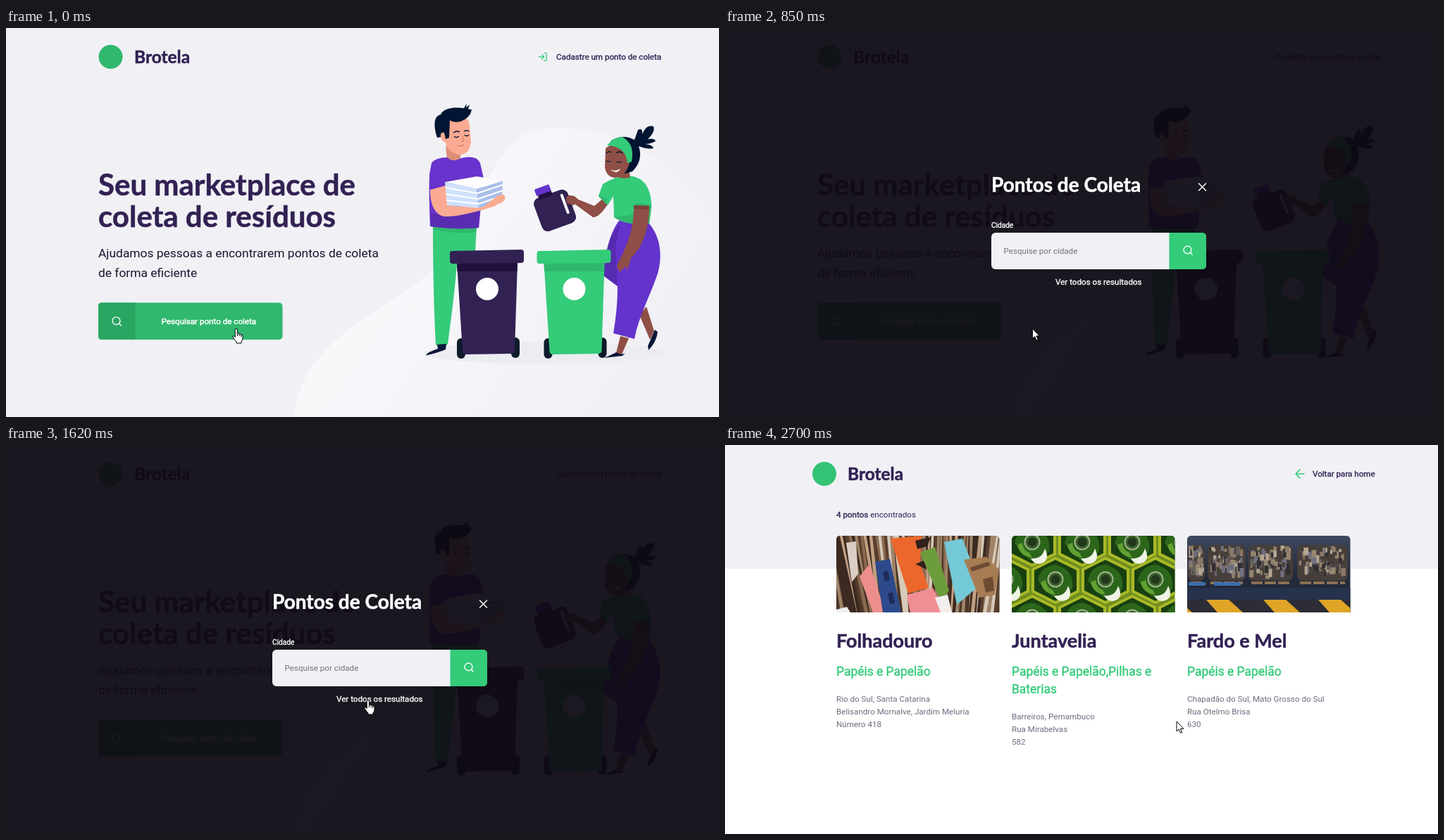
Write an HTML page that moves like this. It is 1012 px wide and 553 px high and loops after 3.48 s.

```html
<!DOCTYPE html>
<html lang="pt-BR">
<head>
<meta charset="utf-8">
<title>Pontos de coleta</title>
<style>
  html, body { margin: 0; width: 100%; height: 100%; overflow: hidden; background: #f0f0f5; }
  svg { display: block; width: 100%; height: 100%; }
  text { font: 11.63px Roboto, sans-serif; fill: #322153; white-space: pre; }
  .title { font: 700 27px Lato, sans-serif; stroke: #322153; stroke-width: .5px; }
  .brand { font-size: 24.5px; }
  .hero { font-size: 42px; }
  .lead { font-size: 17.4px; fill: #1e1430; }
  .semi { stroke: #322153; stroke-width: .35px; }
  .white { fill: #fff; stroke: #fff; }
  .items text { font-size: 17.45px; fill: #34cb79; stroke: #34cb79; stroke-width: .4px; }
  .address text { fill: #6c6c80; }
  .icon { fill: none; stroke-width: 2; stroke-linecap: round; stroke-linejoin: round; }
</style>
</head>
<body>
<svg viewBox="0 0 1012 553">
  <defs>
    <linearGradient id="blobFill" gradientUnits="userSpaceOnUse" x1="600" y1="280" x2="900" y2="480">
      <stop stop-color="#f8f8fb"/><stop offset="1" stop-color="#f0f0f5"/>
    </linearGradient>
    <linearGradient id="wallFill" x2="0" y2="1">
      <stop stop-color="#3d4960"/><stop offset=".5" stop-color="#232a3a"/>
    </linearGradient>
    <clipPath id="photoShape"><path d="M0 109V6Q0 0 6 0H225.500Q231.500 0 231.500 6V109Z"/></clipPath>
    <g id="search" class="icon"><circle cx="11" cy="11" r="8"/><path d="M21 21L16.650 16.650"/></g>
  </defs>

  <g id="home">
    <rect width="1012" height="553" fill="#f0f0f5"/>
    <path fill="url(#blobFill)" d="M408 553C416 480 470 436 530 398C590 362 622 335 650 285C684 222 702 142 776 142C850 140 905 168 950 210C984 240 1000 262 1012 294V553Z"/>
    <ellipse cx="765" cy="462" rx="172" ry="16" fill="#ececf1"/>

    <circle cx="148.500" cy="41" r="17" fill="#2fb86e"/>
    <text class="title brand" x="182" y="50">Brotela</text>
    <g class="icon" stroke="#34cb79" transform="translate(754.500 33.700) scale(.606)">
      <path d="M15 3h4a2 2 0 0 1 2 2v14a2 2 0 0 1-2 2h-4M10 17l5-5-5-5M15 12H3"/>
    </g>
    <text class="semi" x="781" y="45">Cadastre um ponto de coleta</text>

    <text class="title hero" x="131" y="238">Seu marketplace de</text>
    <text class="title hero" x="131" y="282.500">coleta de resíduos</text>
    <text class="lead" x="131" y="326">Ajudamos pessoas a encontrarem pontos de coleta</text>
    <text class="lead" x="131" y="353.500">de forma eficiente</text>

    <rect x="131" y="390.500" width="261.500" height="52.500" rx="5" fill="#2fb86e"/>
    <path d="M183.500 390.500H136Q131 390.500 131 395.500V438Q131 443 136 443H183.500Z" fill="#2aa663"/>
    <use href="#search" stroke="#fff" transform="translate(149 408.800) scale(.68)"/>
    <text class="semi white" x="220.500" y="421" style="stroke-width:.5px">Pesquisar ponto de coleta</text>

    <g id="man">
      <path fill="#34cb79" d="M606 280L668 282L666 320H641C638 370 632 410 627 450L610 451C607 390 606 340 606 280Z"/>
      <path fill="#2fb86e" d="M606 281L668 283L667 290Q640 294 607 286Z"/>
      <path fill="#0b1638" d="M612 450L625 449L624 457Q612 462 596 465.500Q597 461 613 456Z"/>
      <path fill="#dc8f79" d="M624 168L645 172V188Q635 194 626 187Z"/>
      <path fill="#6933cd" d="M604 192Q610 184 626 184Q635 192 646 185Q668 180 673 192L678 214L671 284Q640 287 602 282Q600 240 601 208Z"/>
      <path fill="#5a2cb2" d="M625 205L629 254L674 236L671 284Q640 287 602 282L603 262Q618 270 671 258L630 258Z"/>
      <path fill="#fbab93" d="M602 230L624 224L627 251C650 258 675 250 692 243L695 253C668 261 645 268 623 268C608 266 602 250 602 230Z"/>
      <path fill="#cfe1fb" d="M623 219L668 229L672 256L626 252Z"/>
      <path fill="#a9bfe8" d="M668 229L705 217L704 245L671 256Z"/>
      <path fill="#fdfdff" d="M623 219L668 211L706 217L668 229Z"/>
      <path fill="none" stroke="#fff" stroke-width="2" d="M624 227L669 235L705 223M624 236L670 243L705 231M625 245L671 250L704 239"/>
      <path fill="#fbab93" d="M692 243Q701 235 707 237Q711 243 704 248L689 254L680 252Z"/>
      <path fill="#fbab93" d="M619 145Q622 126 648 127Q656 126 658 138L660 162Q658 181 642 180Q627 177 624 163Q616 160 616 150Z"/>
      <path fill="#021532" d="M612 156C608 143 605 126 617 123C621 113 638 112 650 114L654 107L653 113L658 109L656 115L661 116Q659 128 645 133Q635 135 630 131L629 156L624 158L622 149Q616 147 617 155Z"/>
      <path fill="none" stroke="#021532" stroke-width="1.300" d="M635 149q5-4 9-1M650 147q4-3 7 0M636 154q3 3 7 0M651 152q3 3 6 0"/>
      <path fill="none" stroke="#c9705e" d="M648 153l1 8h-3M640 167q5 2 10-1"/>
    </g>

    <g id="woman">
      <path fill="#8f4f46" d="M909 396L920 431L914 443L899 408ZM872 438L866 462L854 467L874 464L884 441Z"/>
      <path fill="#0b1638" d="M921 429L925 432Q923 447 912 458L911 452L917 438ZM849 469Q861 464 866 461Q874 466 879 462L875 466Z"/>
      <path fill="#6333cb" d="M870 274L911 276C930 296 932 326 925 349C913 384 898 410 892 442L862 434C866 410 868 390 868 367L848 352C850 318 858 290 870 274Z"/>
      <path fill="#552bb0" d="M872 280C862 310 866 330 868 367L848 352C850 318 858 290 872 280Z"/>
      <path fill="#8f4f46" d="M849 241L835 253L808 242Q799 235 795 240L797 250L807 250L833 269Q842 270 855 249Z"/>
      <g transform="rotate(-20 777 258)">
        <rect x="753" y="235" width="51" height="50" rx="9" fill="#322153"/>
        <rect x="763" y="227" width="20" height="11" fill="#20103d"/>
        <rect x="761" y="222" width="22" height="10" rx="2" fill="#6333cb"/>
        <path d="M795 243V269" stroke="#f4f4f8" stroke-width="4" fill="none" stroke-linecap="round"/>
      </g>
      <path fill="#8f4f46" d="M795 240Q806 235 812 244L806 252L796 249Z"/>
      <path fill="#34cb79" d="M847 222Q870 207 890 211C911 215 917 238 916 256L913 278Q882 282 863 269L862 239L854 252L841 239Z"/>
      <path fill="#2fb86e" d="M891 252Q893 246 916 252L913 278Q882 282 863 269Q884 267 892 264ZM842 237L854 243L851 249L841 239Z"/>
      <path fill="#8f4f46" d="M891 252L913 253C913 284 904 312 887 327L882 344L879 339L871 347L868 342L867 337L875 322C884 301 891 285 891 252Z"/>
      <path fill="#7a403a" d="M891 252L913 253V258L891 257Z"/>
      <path fill="#8f4f46" d="M867 205L884 198L886 212Q876 216 867 211Z"/>
      <path fill="#021532" d="M859 160Q876 150 892 159L897 145Q904 141 903 151Q909 136 919 140Q922 147 911 158Q921 156 922 161Q914 165 907 165Q918 166 919 171Q911 173 898 168Q905 188 889 204L878 207Z"/>
      <path fill="#8f4f46" d="M851 171Q861 162 877 169L885 191Q881 210 865 213Q852 212 850 198Z"/>
      <path fill="#34cb79" d="M853 167Q862 155 875 155Q893 165 888 190L882 192Q880 168 853 167Z"/>
      <path fill="none" stroke="#021532" stroke-width="1.300" d="M852 178q4-4 7-1M866 178q5-4 9 0M852 189q3 2 6 0M866 190q4 2 8 0"/>
      <path fill="#fff" d="M857 201Q865 205 872 200Q868 209 857 201Z"/>
    </g>
    <g id="bins"></g>
  </g>

  <g id="modal">
    <rect width="1012" height="553" fill="#0e0a14" opacity=".94"/>
    <text class="title white" x="378" y="233" style="font-size:28px">Pontos de Coleta</text>
    <path d="M672.500 221l10 10m0-10l-10 10" class="icon" stroke="#fff" style="stroke-width:1.5px"/>
    <text class="semi white" x="378" y="283.500" style="font-size:10.18px">Cidade</text>
    <rect x="378" y="291" width="305" height="52" rx="6" fill="#f0f0f5"/>
    <path d="M630.500 291H677Q683 291 683 297V337Q683 343 677 343H630.500Z" fill="#34cb79"/>
    <text x="395.500" y="321" style="fill:#6f7575">Pesquise por cidade</text>
    <use href="#search" stroke="#fff" transform="translate(649 308) scale(.68)"/>
    <text class="semi white" x="469" y="365">Ver todos os resultados</text>
  </g>

  <g id="results">
    <rect width="1012" height="553" fill="#fff"/>
    <rect width="1012" height="176" fill="#f0f0f5"/>
    <circle cx="141" cy="41" r="17" fill="#32c374"/>
    <text class="title brand" x="174" y="50">Brotela</text>
    <path class="icon" stroke="#34cb79" transform="translate(805.800 30.800) scale(.85)" d="M19 12H5M12 19l-7-7 7-7"/>
    <text class="semi" x="834" y="45">Voltar para home</text>
    <text class="semi" x="158" y="103">4 pontos</text>
    <text x="206.200" y="103">encontrados</text>
    <g id="cards"></g>
  </g>

  <circle id="click" r="11" fill="#f2dc00" opacity=".55"/>
  <g id="hand" stroke="#000">
    <path fill="#fff" d="M4.200 2Q4.200 .5 5.800 .5T7.400 2V7.500Q9.600 6.500 10.200 8Q12.200 7.300 12.700 8.900Q15 8.500 15 10.800V14Q15 17 13 19V21H6V19Q4 17 .9 12.400Q.6 10 2.800 11L4.200 12.600Z"/>
    <path fill="none" d="M7.400 7.500V11M10.200 8V11M12.700 9V12"/>
  </g>
  <path id="arrow" fill="#fff" stroke="#000" d="M0 0V14L3.300 11L5.500 16.500L7.800 15.500L5.600 10.300H10Z"/>
</svg>

<script>
const el = id => document.getElementById(id);

let seed = 7;
const random = () => (seed = seed * 16807 % 2147483647) / 2147483647;
const pick = list => list[Math.floor(random() * list.length)];
const times = (count, draw) => Array.from({ length: count }, (_, i) => draw(i)).join('');
const shape = (fill, d) => `<path fill="${fill}" d="${d}"/>`;
const browns = ['#8a6a50', '#c2a083', '#5b4030', '#d6cab8', '#3b2a22', '#a08468'];
const scraps = ['#8b7a68', '#b5a692', '#4a423e', '#67605c', '#2f2e33', '#6f6f80', '#94866f'];

function bin(x, body, shade) {
  return `<g transform="translate(${x} 0)">
    <rect x="11" y="441" width="12" height="29" rx="6" fill="#0d1b2b"/>
    <rect x="88" y="440" width="12" height="29" rx="6" fill="#0d1b2b"/>
    ${shape(body, 'M11 334H97L93 458Q93 463 88 463L24 464Q19 464 19 459Z')}
    ${shape(shade, 'M11 334H97L96.500 346H11.500Z')}
    ${shape(body, 'M4 317L102 315Q106 315 106 319V330Q106 334 102 334L5 335Q1 335 1 331V321Q1 317 4 317Z')}
    <circle cx="54" cy="371" r="16" fill="#fff"/></g>`;
}
el('bins').innerHTML = bin(629, '#322153', '#20103d') + bin(752.5, '#34cb79', '#2fb86e');

function paperPhoto() {
  const strips = times(60, i => {
    const x = i * 4.2 - 12, lean = (110 - x) * .16 + random() * 10;
    return shape(pick(browns), `M${x} 0h${2 + random() * 6}l${lean} 109h-5z`);
  });
  return '<rect width="232" height="109" fill="#4b3527"/>' + strips +
    shape('#d9cfc4', 'M14 10L28 8L31 54L22 66Z') +
    shape('#ec8f8c', 'M33 58L47 40L70 109H52Z') +
    shape('#2c4a8c', 'M55 37L76 33L92 109H66Z') +
    shape('#1c2c58', 'M66 52l7-2l3 13l-7 2zM73 82l7-2l3 16l-7 1z') +
    shape('#ec672b', 'M77 4L121 0L119 40L131 74L102 82Z') +
    shape('#30201c', 'M112 7l22-5l-5 13l-14 4zM112 40l14-5l2 13z') +
    shape('#6d9c3c', 'M119 24L140 16L160 78L148 92Z') +
    shape('#74c9d6', 'M153 9L179 4L204 70L171 98Z') +
    shape('#f08f93', 'M100 84L137 74L153 109H105Z') +
    shape('#a87c52', 'M181 34L213 30L231 48L225 84L203 88Z') +
    shape('#6d4b33', 'M190 45l26-8l3 5l-27 9zM208 62l14-4l2 20l-12 3z') +
    shape('#f2eeee', 'M0 105L15 101L20 109H0ZM140 88L158 84L164 109H148Z');
}

function bottlePhoto() {
  const row = (y, start) => times(5, i => `<g transform="translate(${start + i * 71} ${y})">
      <path d="M-32-14L0-30L32-14V17L0 33L-32 17Z" fill="#183f10" stroke="#a9b928" stroke-width="4"/>
      <path d="M-25 2Q-22-18 0-21Q27-14 24 12Q16 28 -4 25Z" fill="#2c661b"/>
      <path d="M-21 4Q-18 20 0 22L-4 15Q-13 12 -14 1Z" fill="#62a032"/>
      <circle r="10.500" fill="#3a6329" stroke="#a3b48f" stroke-width="2"/>
      <circle r="6.500" fill="#23371d"/>
      <path d="M-2 23Q14 25 18 9Q27 28 10 31Q1 30 -2 23Z" fill="#eef3e6"/></g>`);
  return '<rect width="232" height="109" fill="#6f8d1d"/>' + row(9, -42) + row(62, -9) + row(116, -42);
}

function balePhoto() {
  const bale = (x, width) => `<rect x="${x}" y="13" width="${width}" height="51" rx="8" fill="#463e3a"/>` +
    times(75, () => `<rect x="${x + 1 + random() * (width - 8)}" y="${14 + random() * 36}"
      width="${2 + random() * 5}" height="${4 + random() * 9}" fill="${pick(scraps)}"/>`) +
    `<path d="M${x + 4} 67h${width - 8}" stroke="#8d7153" stroke-width="4" stroke-dasharray="16 3"/>`;
  const stripes = [-45, 27, 108, 186].map(x => shape('#e0a526', `M${x} 91h32l20 18h-36z`)).join('');
  return '<rect width="232" height="109" fill="url(#wallFill)"/>' +
    bale(1, 24) + bale(29, 54) + bale(87, 63) + bale(156, 72) +
    shape('#3c6dab', 'M2 66H26V71H2ZM38 66H76V71H38Z') +
    shape('#27324d', 'M0 74H232V91H0Z') + shape('#2c2d36', 'M0 91H232V109H0Z') + stripes;
}

function card(x, photo, name, items, address) {
  const top = 365 + (items.length - 1) * 24.5;
  const lines = (list, y, gap) => list.map((line, i) => `<text y="${y + i * gap}">${line}</text>`).join('');
  return `<g transform="translate(${x} 0)">
    <g transform="translate(0 129)" clip-path="url(#photoShape)">${photo}</g>
    <text class="title" y="288">${name}</text>
    <g class="items">${lines(items, 328, 24.5)}</g>
    <g class="address">${lines(address, top, 18.2)}</g></g>`;
}
el('cards').innerHTML =
  card(158, paperPhoto(), 'Folhadouro', ['Papéis e Papelão'],
    ['Rio do Sul, Santa Catarina', 'Belisandro Mornalve, Jardim Meluria', 'Número 418']) +
  card(407, bottlePhoto(), 'Juntavelia', ['Papéis e Papelão,Pilhas e', 'Baterias'],
    ['Barreiros, Pernambuco', 'Rua Mirabelvas', '582']) +
  card(656, balePhoto(), 'Fardo e Mel', ['Papéis e Papelão'],
    ['Chapadão do Sul, Mato Grosso do Sul', 'Rua Otelmo Brisa', '630']);

const LOOP = 3480, OPEN = 460, RESULTS = 1770;

const bezier = (a, b, c, d, u) =>
  (1 - u) ** 3 * a + 3 * u * (1 - u) ** 2 * b + 3 * u * u * (1 - u) * c + u ** 3 * d;

// Seven arrow poses along a curve, spread over 460 ms and easing in and out.
const glide = (start, xs, ys) => Array.from({ length: 7 }, (_, i) => {
  const s = (i + 1) / 7, u = s * s * (3 - 2 * s);
  return [start + i * 76.6, 'arrow', bezier(...xs, u), bezier(...ys, u)];
});

// Each pose: start time, pointer kind, x, y.
const poses = [
  [0, 'hand', 321, 427],
  [70, 'hand', 321, 416.5],
  [OPEN, 'arrow', 327, 418],
  ...glide(620, [327, 350, 470, 510], [418, 455, 440, 371]),
  [1160, 'arrow', 510, 370],
  [1230, 'arrow', 510.5, 369],
  [1310, 'hand', 508, 363],
  [1390, 'hand', 508, 362],
  ...glide(2170, [513, 550, 690, 641], [362, 290, 290, 391]),
  [2700, 'arrow', 641, 393]
];
const clicks = [[390, OPEN, 327, 417], [1540, 1620, 513, 362]];

const show = (id, on) => el(id).style.display = on ? '' : 'none';
const place = (id, x, y) => el(id).setAttribute('transform', `translate(${x} ${y})`);

function render(now) {
  const t = now % LOOP;
  show('home', t < RESULTS);
  show('modal', t >= OPEN && t < RESULTS);
  show('results', t >= RESULTS);

  const [, kind, x, y] = poses.filter(pose => pose[0] <= t).pop();
  show('hand', kind === 'hand');
  show('arrow', kind === 'arrow');
  place(kind, x, y);

  const click = clicks.find(([from, to]) => t >= from && t < to);
  show('click', click);
  if (click) place('click', click[2], click[3]);
}

const began = performance.now();
function tick() {
  render(performance.now() - began);
  requestAnimationFrame(tick);
}
tick();
</script>
</body>
</html>
```
